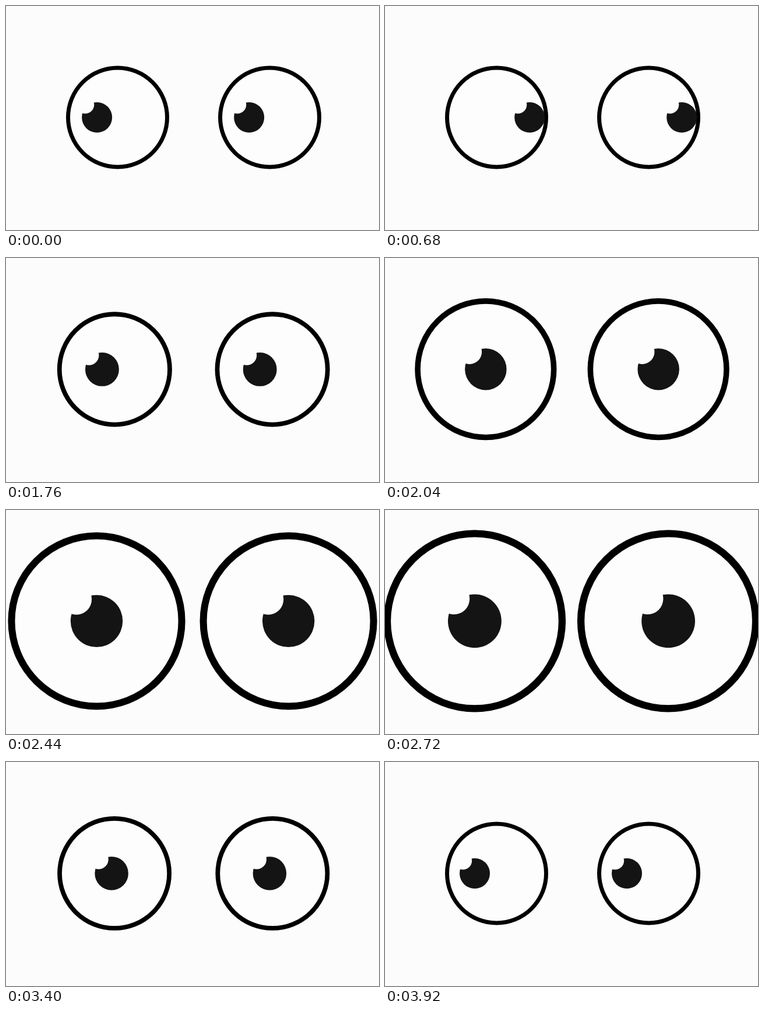
An HTML page for the animation above (4080 ms loop, 640 by 384 pixels).

```html
<!DOCTYPE html>
<html lang="en">
<head>
<meta charset="utf-8">
<title>Googly eyes</title>
<style>
  html, body { margin: 0; width: 100%; height: 100%; overflow: hidden; background: #fcfcfc; }
  svg { display: block; width: 640px; height: 384px; }
</style>
</head>
<body>
<svg viewBox="0 0 640 384">
  <defs>
    <circle id="ball" r="85" fill="#fdfdfd" stroke="#000" stroke-width="7"/>
    <g id="pupil">
      <circle r="26" fill="#141414"/>
      <circle cx="-20.2" cy="-21.7" r="15.3" fill="#fdfdfd"/>
    </g>
  </defs>
  <g class="eye"><use href="#ball"/><use class="look" href="#pupil"/></g>
  <g class="eye"><use href="#ball"/><use class="look" href="#pupil"/></g>
</svg>
<script>
const LOOP = 4080, STEP = 40, LEFT = -37.5, RIGHT = 57, GROWTH = 0.765;
const eyes = document.querySelectorAll('.eye');
const pupils = document.querySelectorAll('.look');

const smooth = u => u * u * (3 - 2 * u);
const cubic = u => u < 0.5 ? 4 * u ** 3 : 1 - 4 * (1 - u) ** 3;

// Eased progress from 0 to 1 between two times
const ramp = (t, from, to, ease = smooth) =>
  ease(Math.min(1, Math.max(0, (t - from) / (to - from))));

function draw(t) {
  const look = LEFT
    + (RIGHT - LEFT) * (ramp(t, -50, 510) - ramp(t, 655, 1395))
    - LEFT * (ramp(t, 1490, 2040) - ramp(t, 3275, 3855));
  const grow = GROWTH * (ramp(t, 1488, 2608) - ramp(t, 2705, 3737, cubic));
  const spread = ramp(t, 1514, 2572) - ramp(t, 2810, 3691, cubic);
  const centers = [191.5 - 37.6 * spread, 452.5 + 33.6 * spread];
  const y = 191 - 0.8 * grow;

  eyes.forEach((eye, i) =>
    eye.setAttribute('transform', `translate(${centers[i]} ${y}) scale(${1 + grow})`));
  pupils.forEach(p => p.setAttribute('transform', `translate(${look} 0)`));
}

function tick() {
  const t = performance.now() % LOOP;
  draw(Math.floor(t / STEP) * STEP);
  requestAnimationFrame(tick);
}
tick();
</script>
</body>
</html>
```
